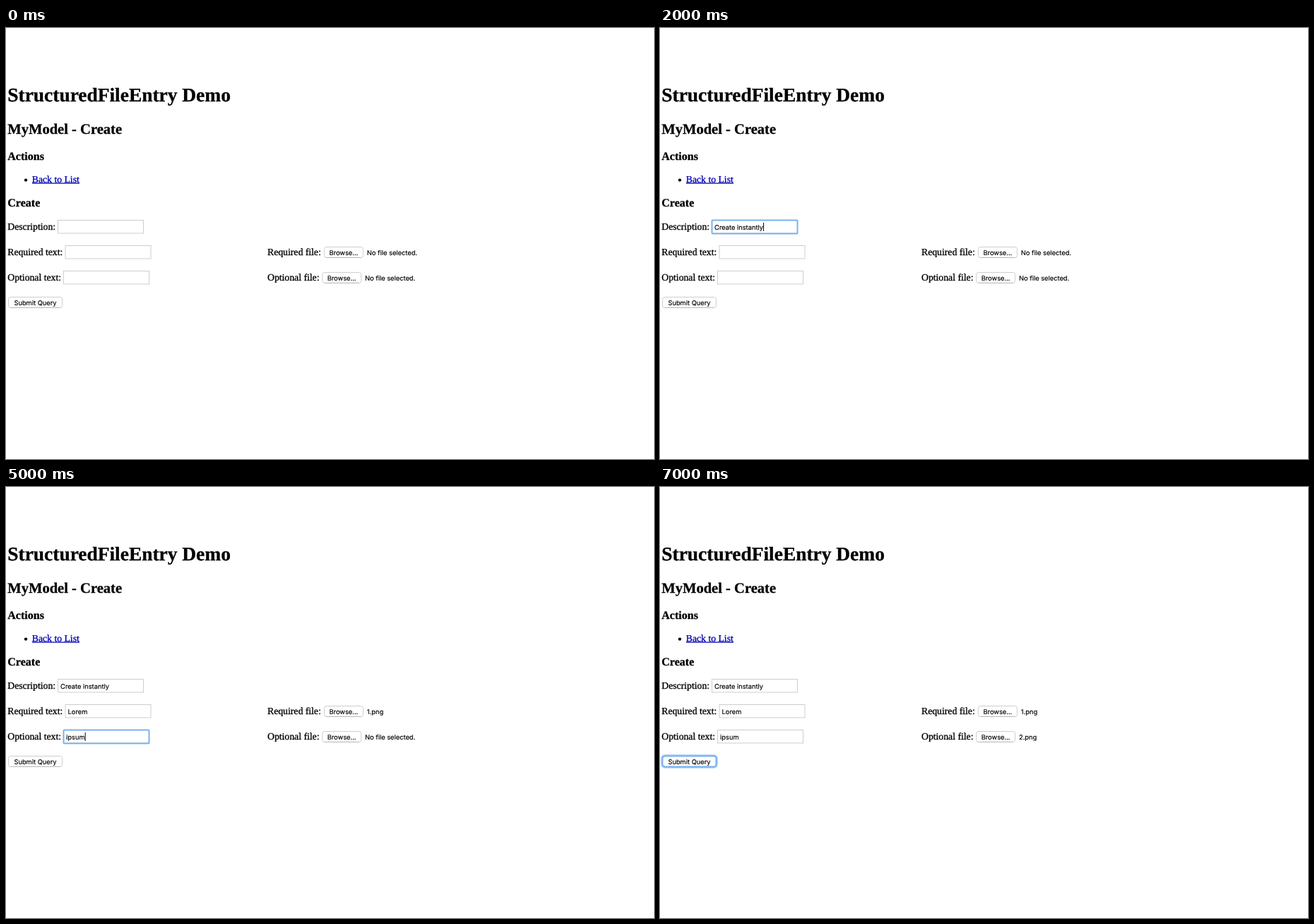
An HTML page for the animation above (8000 ms loop, 917 by 611 pixels).

```html
<!DOCTYPE html>
<html lang="en">
<head>
<meta charset="utf-8">
<title>Create form</title>
<style>
  html, body { margin: 0; width: 100%; height: 100%; overflow: hidden; background: #fff; }
  svg { display: block; width: 917px; height: 611px; }
  text {
    font: 13.71px "Liberation Serif", serif; text-rendering: geometricPrecision;
    stroke: #000; stroke-width: .3;
  }
  .h1 { font-size: 27.43px; font-weight: bold; }
  .h2 { font-size: 20.57px; font-weight: bold; }
  .h3 { font-size: 16.05px; font-weight: bold; }
  .link { fill: #0000b4; stroke: #0000b4; }
  .ui { font: 9.3px Inter, sans-serif; stroke-width: .15; }
  .mid { text-anchor: middle; }
  rect { fill: #fff; stroke: #cdcdcd; }
  .ring { fill: none; stroke: #79b1f0; stroke-width: 2; }
  .glow { fill: none; stroke: #a3cbfa; stroke-width: 2; }
</style>
</head>
<body>
<svg viewBox="0 0 917 611">
  <text class="h1" x="2.3" y="104">StructuredFileEntry Demo</text>
  <text class="h2" x="2.3" y="149.8">MyModel - Create</text>
  <text class="h3" x="2.3" y="187">Actions</text>
  <circle cx="28" cy="215.6" r="2.2"/>
  <text class="link" x="36.8" y="218.6">Back to List</text>
  <path d="M37 220.2H104" stroke="#0000b4" stroke-width="1.2"/>
  <text class="h3" x="2.3" y="252.8">Create</text>
  <g id="form"></g>
</svg>
<script>
const form = document.getElementById('form');
const LOOP = 8000;

const text = (x, y, str, cls = '') => `<text class="${cls}" x="${x}" y="${y}">${str}</text>`;
const rect = (x, y, w, h, r = 0, cls = '') =>
  `<rect class="${cls}" x="${x}" y="${y}" width="${w}" height="${h}" rx="${r}"/>`;

function field(label, x, y, value, focused) {
  return text(2.3, y + 3.7, label) + rect(x, y - 9.5, 121, 18.5) +
    (focused ? rect(x, y - 9.5, 121, 19, 1, 'ring') : '') +
    text(x + 3.6, y + 3.6, value, 'ui' + (focused ? ' typed' : ''));
}

function button(label, x, y, w, focused) {
  return (focused ? rect(x - 1.2, y - 8.7, w + 2.4, 17.4, 4.5, 'glow') : '') +
    rect(x, y - 7.5, w, 15, 3) +
    (focused ? rect(x, y - 7.5, w, 15, 3.5, 'ring')
             : `<path d="M${x + 3} ${y + 7.5}h${w - 6}" stroke="#b6b6b6"/>`) +
    text(x + w / 2, y + 3.6, label, 'ui mid');
}

function picker(label, x, y, file, focused) {
  return text(370, y + 3.7, label) + button('Browse...', x, y, 55, focused) +
    text(x + 60.4, y + 3.6, file || 'No file selected.', 'ui');
}

// Each second moves on one step of filling in the form.
function draw(step) {
  form.innerHTML =
    field('Description:', 73.5, 282, step > 1 ? 'Create instantly' : '', step === 1 || step === 2) +
    field('Required text:', 84, 318, step > 2 ? 'Lorem' : '', step === 3) +
    field('Optional text:', 81.5, 354, step > 4 ? 'ipsum' : '', step === 5) +
    picker('Required file:', 450.4, 318, step > 3 && '1.png', step === 4) +
    picker('Optional file:', 447.6, 354, step > 5 && '2.png', step === 6) +
    button('Submit Query', 3.5, 389, 76, step === 7);

  const typed = form.querySelector('.typed');
  if (typed) {
    const x = +typed.getAttribute('x') + typed.getComputedTextLength() + .6;
    const y = typed.getAttribute('y') - 9.6;
    form.insertAdjacentHTML('beforeend', `<path d="M${x} ${y}v12" stroke="#000"/>`);
  }
}

let shown = -1;
function tick() {
  const step = Math.floor(performance.now() % LOOP / 1000);
  if (step !== shown) draw(shown = step);
  requestAnimationFrame(tick);
}
tick();
</script>
</body>
</html>
```
